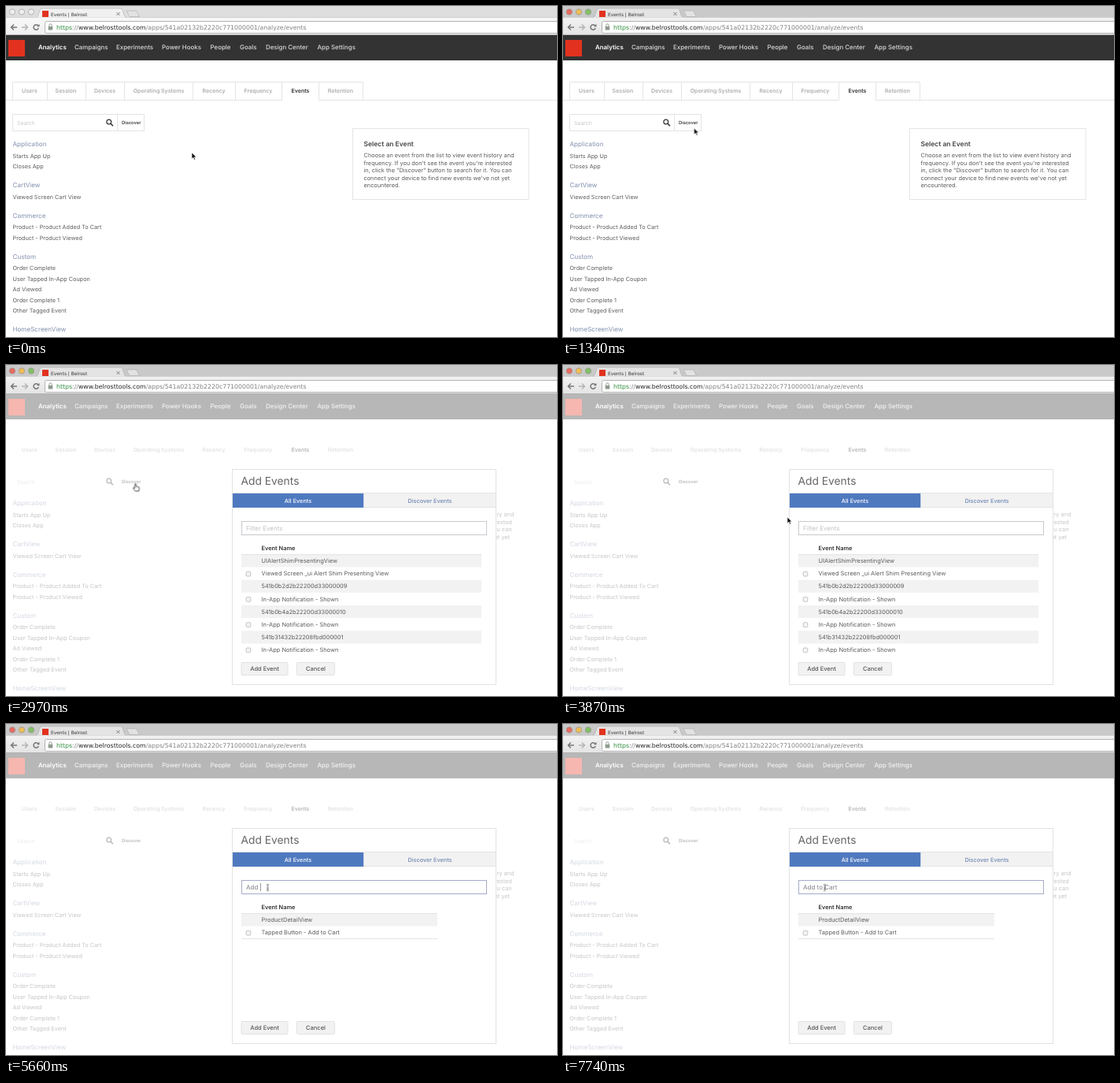
An HTML page that plays this animation: 700 px wide and 420 px high, repeating every 8000 ms.

```html
<!DOCTYPE html>
<html lang="en">
<head>
<meta charset="utf-8">
<title>Events</title>
<style>
  html, body { margin: 0; width: 100%; height: 100%; overflow: hidden; background: #fff; }
  svg { display: block; width: 700px; height: 420px; font-family: Inter, sans-serif; text-rendering: geometricPrecision; }
  .browser { font-family: "DejaVu Sans", sans-serif; }
  .mid { text-anchor: middle; }
  .nav { font-size: 7.9px; font-weight: 500; fill: #dadada; }
  .tabs { font-size: 7px; font-weight: 600; fill: #adadad; }
  .heads { font-size: 8.1px; fill: #8090ae; }
  .items { font-size: 7.25px; fill: #5c5c5c; }
  .info { font-size: 7.36px; fill: #5c5c5c; }
  .rows { font-size: 7.45px; fill: #5c5c5c; }
  .line { fill: none; stroke: #e4e4e4; }
  .box { fill: #f5f5f5; stroke: #b4b4b4; stroke-width: .8; }
  .stripe { fill: #f2f2f2; }
  .button { fill: #f2f2f2; stroke: #e2e2e2; }

  .strip, .bar, .lights, .frame, .page, .field, .hint, .full, .found, .typed span, .caret, .pointer, .pointer > * {
    animation: 8s step-end infinite;
  }
  .strip { animation-name: strip; }
  .bar { animation-name: bar; }
  .lights { animation-name: lights; }
  .frame { animation-name: close; }
  .page { animation-name: open; }
  .field { animation-name: focus; }
  .hint { animation-name: hint; }
  .full { animation-name: full; }
  .found { animation-name: found; }
  .caret { animation-name: blink; }
  .pointer { animation-name: move; }
  .pointer .arrow { animation-name: arrow; }
  .pointer .hand { animation-name: hand; }
  .pointer .beam { animation-name: beam; }

  @keyframes strip { 0% { fill: #dedede; } 16.75%, 100% { fill: #c9c9c9; } }
  @keyframes bar { 0% { fill: #f0f0f0; } 16.75%, 100% { fill: #e4e4e4; } }
  @keyframes lights { 0% { opacity: 0; } 16.75%, 100% { opacity: 1; } }
  @keyframes close { 0% { opacity: 1; } 37.125%, 100% { opacity: 0; } }
  @keyframes open { 0% { opacity: 0; } 37.125%, 100% { opacity: 1; } }
  @keyframes focus { 0% { stroke: #c8c9ce; } 54%, 100% { stroke: #a6abc9; } }
  @keyframes hint { 0% { opacity: 1; } 68.875%, 100% { opacity: 0; } }
  @keyframes full { 0% { opacity: 1; } 70.75%, 100% { opacity: 0; } }
  @keyframes found { 0% { opacity: 0; } 70.75%, 100% { opacity: 1; } }
  @keyframes blink {
    0% { opacity: 0; } 54% { opacity: 1; } 59.625% { opacity: 0; }
    68.875% { opacity: 1; } 96.75%, 100% { opacity: 0; }
  }

  .typed { font-size: 8px; line-height: 11px; white-space: pre; color: #808080; }
  .typed i { display: inline-block; width: .8px; height: 9.5px; vertical-align: -2px; background: #999; }
  .typed .k1 { animation-name: k1; }
  .typed .k2 { animation-name: k2; }
  .typed .k3 { animation-name: k3; }
  .typed .k4 { animation-name: k4; }
  .typed .k5 { animation-name: k5; }
  .typed .k6 { animation-name: k6; }
  .typed .k7 { animation-name: k7; }
  .typed .k8 { animation-name: k8; }
  @keyframes k1 { 0% { font-size: 0; } 68.875%, 100% { font-size: 8px; } }
  @keyframes k2 { 0% { font-size: 0; } 70.75%, 100% { font-size: 8px; } }
  @keyframes k3 { 0% { font-size: 0; } 72.625%, 100% { font-size: 8px; } }
  @keyframes k4 { 0% { font-size: 0; } 74.375%, 100% { font-size: 8px; } }
  @keyframes k5 { 0% { font-size: 0; } 81.875%, 100% { font-size: 8px; } }
  @keyframes k6 { 0% { font-size: 0; } 85.625%, 100% { font-size: 8px; } }
  @keyframes k7 { 0% { font-size: 0; } 89.375%, 100% { font-size: 8px; } }
  @keyframes k8 { 0% { font-size: 0; } 91.125%, 100% { font-size: 8px; } }

  @keyframes move {
    0% { transform: translate(236px, 186px); }
    1.875% { transform: translate(190px, 166px); }
    3.75% { transform: translate(164px, 154.5px); }
    7.5% { transform: translate(165px, 155px); }
    9.25% { transform: translate(166.5px, 155px); }
    18.625% { transform: translate(164.5px, 150.5px); }
    44.625% { transform: translate(190px, 161px); }
    46.5% { transform: translate(235px, 178px); }
    48.375% { transform: translate(285px, 193px); }
    50.25% { transform: translate(320px, 204px); }
    52.125%, 100% { transform: translate(332.5px, 207.5px); }
  }
  @keyframes arrow { 0% { opacity: 1; } 18.625% { opacity: 0; } 44.625% { opacity: 1; } 50.25%, 100% { opacity: 0; } }
  @keyframes hand { 0% { opacity: 0; } 18.625% { opacity: 1; } 44.625%, 100% { opacity: 0; } }
  @keyframes beam { 0% { opacity: 0; } 50.25%, 100% { opacity: 1; } }
</style>
</head>
<body>
<svg viewBox="0 0 700 420">
  <defs>
    <linearGradient id="shade" x2="0" y2="1">
      <stop stop-color="#fff" stop-opacity=".5"/>
      <stop offset="1" stop-color="#fff" stop-opacity="0"/>
    </linearGradient>
    <clipPath id="list"><path d="M288 220H610V365H288Z"/></clipPath>
    <rect id="check" class="box" x="305.2" y="-2.6" width="5.6" height="5.6" rx="1"/>
  </defs>
  <rect width="700" height="420" fill="#fff"/>

  <g class="browser">
    <rect class="strip" width="700" height="15"/>
    <rect class="bar" y="14" width="700" height="23"/>
    <path d="M0 14.5H700" stroke="#b8b8b8" stroke-width=".7"/>
    <path class="bar" d="M37 15Q40 14.5 41 11L43 5Q43.6 3 46 3H145Q147.4 3 148 5L150 11Q151 14.5 154 15Z" stroke="#a8a8a8" stroke-width=".6"/>
    <path class="bar" d="M36 14.7H155V17H36Z"/>
    <rect y="14.7" width="700" height="22.3" fill="url(#shade)"/>
    <path d="M0 36.6H700" stroke="#a0a0a0" stroke-width=".8"/>
    <path d="M153 6H165.5L169.5 13.5H157Z" fill="#e2e2e2" stroke="#aaa" stroke-width=".6"/>
    <g fill="#efefef" stroke="#a2a2a2" stroke-width=".8">
      <circle cx="8" cy="7.5" r="3.6"/><circle cx="20" cy="7.5" r="3.6"/><circle cx="32" cy="7.5" r="3.6"/>
    </g>
    <g class="lights" stroke="#8a8a8a" stroke-width=".5">
      <circle cx="8" cy="7.5" r="3.6" fill="#ea6a60"/><circle cx="20" cy="7.5" r="3.6" fill="#efbd58"/><circle cx="32" cy="7.5" r="3.6" fill="#83c065"/>
    </g>
    <rect x="46" y="6" width="8" height="8" fill="#e2321f"/>
    <text x="57" y="12.5" font-size="5.9" fill="#333">Events | Belrost</text>
    <path d="M140.5 8L144.5 12M144.5 8L140.5 12" stroke="#777" stroke-width=".9"/>
    <g fill="none" stroke="#777" stroke-width="1.5">
      <path d="M14 27H7M10 23.5L6.5 27 10 30.5"/>
      <path d="M20 27H27M24 23.5L27.5 27 24 30.5" stroke="#b5b5b5"/>
      <path d="M41 25.3A3.2 3.2 0 1 0 41.3 28"/>
    </g>
    <path d="M42.5 22.8V26.2H39Z" fill="#777"/>
    <rect x="49.5" y="19.5" width="660" height="15" rx="2" fill="#fff" stroke="#b4b4b4"/>
    <rect x="53.7" y="26" width="5.6" height="4.5" fill="#8e9a8e"/>
    <path d="M54.8 26V24.5A1.7 1.7 0 0 1 58.2 24.5V26" fill="none" stroke="#8e9a8e"/>
    <text x="64" y="29.8" font-size="7.8" fill="#808080"><tspan fill="#2e8b3a">https</tspan>://<tspan fill="#222">www.belrosttools.com</tspan>/apps/541a02132b2220c771000001/analyze/events</text>
  </g>

  <rect y="37" width="700" height="32" fill="#333"/>
  <rect x="3" y="43" width="21" height="21" fill="#e2321f"/>
  <g class="nav">
    <text x="41" y="55.3" font-weight="600" fill="#fff">Analytics</text>
    <text x="87" y="55.3">Campaigns</text>
    <text x="140" y="55.3">Experiments</text>
    <text x="198" y="55.3">Power Hooks</text>
    <text x="259.5" y="55.3">People</text>
    <text x="297" y="55.3">Goals</text>
    <text x="330" y="55.3">Design Center</text>
    <text x="395.5" y="55.3">App Settings</text>
  </g>

  <g class="frame">
    <path class="line" d="M0 119.5H350.5V96.5M397.5 96.5V119.5H700M8.5 119.5V96.5H453.5V119.5M52.5 97V119M101.5 97V119M150.5 97V119M237.5 97V119M291.5 97V119"/>
    <path class="line" d="M8.5 137.5H175.5V158.5H8.5ZM141.5 138V158"/>
    <rect class="line" x="440.5" y="155.5" width="223.5" height="90"/>
  </g>
  <g class="tabs mid">
    <text x="30" y="110">Users</text>
    <text x="76" y="110">Session</text>
    <text x="125.5" y="110">Devices</text>
    <text x="194" y="110">Operating Systems</text>
    <text x="264" y="110">Recency</text>
    <text x="320.5" y="110">Frequency</text>
    <text x="374" y="110" fill="#333">Events</text>
    <text x="425" y="110">Retention</text>
  </g>

  <text x="14" y="150.5" font-size="6.9" fill="#c8c8c8">Search</text>
  <g fill="none" stroke="#333" stroke-width="1.2"><circle cx="130.8" cy="147" r="2.9"/><path d="M133 149.2L136 152.2" stroke-width="1.6"/></g>
  <text x="147" y="150" font-size="5.8" font-weight="500" fill="#222">Discover</text>

  <g class="heads">
    <text x="8.5" y="178">Application</text>
    <text x="8.5" y="230">CartView</text>
    <text x="8.5" y="269">Commerce</text>
    <text x="8.5" y="320.8">Custom</text>
    <text x="8.5" y="412.8">HomeScreenView</text>
  </g>
  <g class="items">
    <text x="8.5" y="192.7">Starts App Up</text>
    <text x="8.5" y="206.2">Closes App</text>
    <text x="8.5" y="244.7">Viewed Screen Cart View</text>
    <text x="8.5" y="283.2">Product - Product Added To Cart</text>
    <text x="8.5" y="296.7">Product - Product Viewed</text>
    <text x="8.5" y="335.2">Order Complete</text>
    <text x="8.5" y="348.7">User Tapped In-App Coupon</text>
    <text x="8.5" y="362.2">Ad Viewed</text>
    <text x="8.5" y="375.7">Order Complete 1</text>
    <text x="8.5" y="389">Other Tagged Event</text>
  </g>

  <text x="454.5" y="177.5" font-size="8.5" font-weight="600" fill="#444">Select an Event</text>
  <g class="info">
    <text x="454.5" y="192.2">Choose an event from the list to view event history and</text>
    <text x="454.5" y="201.7">frequency. If you don't see the event you're interested</text>
    <text x="454.5" y="211.2">in, click the "Discover" button to search for it. You can</text>
    <text x="454.5" y="220.7">connect your device to find new events we've not yet</text>
    <text x="454.5" y="230.2">encountered.</text>
  </g>

  <g class="page">
    <rect y="37" width="700" height="383" fill="#fff" opacity=".65"/>
    <rect x="287.5" y="132.5" width="335" height="273" fill="#fff" stroke="#e2e2e2"/>
    <text x="298.5" y="152" font-size="13.8" fill="#666">Add Events</text>
    <path d="M288 163H454.5V181H288Z" fill="#4f79bf"/>
    <path d="M454.5 163H622V181H454.5Z" fill="#f2f2f2"/>
    <path class="line" d="M288 162.5H622M455 180.5H622"/>
    <g class="mid" font-size="7.3" font-weight="500">
      <text x="371" y="174.5" fill="#fff">All Events</text>
      <text x="538.5" y="174.5" fill="#7088b4">Discover Events</text>
    </g>
    <rect class="field" x="299.5" y="198.5" width="311" height="17" fill="#fff"/>
    <text class="hint" x="305" y="210.3" font-size="8" fill="#c2c2c2">Filter Events</text>
    <foreignObject x="305" y="201.8" width="200" height="12">
      <div class="typed"><span class="k1">A</span><span class="k2">dd </span><span class="k3">t</span><span class="k4">o</span><span class="k5"> </span><span class="k6">C</span><span class="k7">a</span><span class="k8">rt</span><i class="caret"></i></div>
    </foreignObject>

    <text x="324.5" y="235.2" font-size="7.4" font-weight="600" fill="#333">Event Name</text>
    <use href="#check" y="265"/>
    <g class="rows full" clip-path="url(#list)">
      <path class="stripe" d="M299 240.5H604V256.5H299ZM299 272.7H604V288.8H299ZM299 305H604V321H299ZM299 337.3H604V353.4H299Z"/>
      <path class="line" d="M299 240.5H604"/>
      <use href="#check" y="297.2"/><use href="#check" y="329.4"/><use href="#check" y="361.6"/>
      <text x="324.5" y="251">UIAlertShimPresentingView</text>
      <text x="324.5" y="267.2">Viewed Screen _ui Alert Shim Presenting View</text>
      <text x="324.5" y="283.3">541b0b2d2b22200d33000009</text>
      <text x="324.5" y="299.5">In-App Notification - Shown</text>
      <text x="324.5" y="315.6">541b0b4a2b22200d33000010</text>
      <text x="324.5" y="331.8">In-App Notification - Shown</text>
      <text x="324.5" y="347.9">541b31432b22208fbd000001</text>
      <text x="324.5" y="364.1">In-App Notification - Shown</text>
    </g>
    <g class="rows found">
      <path d="M299 240H604V257H299Z" fill="#fff"/>
      <path class="stripe" d="M299 240.5H548V256.5H299Z"/>
      <path class="line" d="M299 240.5H548M299 272.5H548"/>
      <text x="324.5" y="251">ProductDetailView</text>
      <text x="324.5" y="267.2">Tapped Button - Add to Cart</text>
    </g>

    <rect class="button" x="299" y="377.5" width="59" height="16" rx="1"/>
    <rect class="button" x="369.5" y="377.5" width="48" height="16" rx="1"/>
    <g class="mid" font-size="7.5" font-weight="500" fill="#555">
      <text x="328.5" y="388">Add Event</text>
      <text x="393.5" y="388">Cancel</text>
    </g>
  </g>

  <g class="pointer">
    <path class="arrow" d="M0 0V8L1.9 6.3 3.2 9.2 4.5 8.6 3.3 5.8H5.8Z" fill="#111" stroke="#fff" stroke-width=".6"/>
    <path class="hand" d="M-.9 .7Q0-.5 .9 .7V3.7L4.2 4.3Q5 4.7 4.9 6L4.2 9.5H-.2L-2.9 6.2Q-3.2 5-2 5.1L-.9 6Z" fill="#fff" stroke="#222" stroke-width=".8"/>
    <path class="beam" d="M-1.5-4Q0-4 0-3Q0-4 1.5-4M0-3V3M-1.5 4Q0 4 0 3Q0 4 1.5 4M-1 1H1" fill="none" stroke="#444" stroke-width=".8"/>
  </g>
</svg>
</body>
</html>
```
